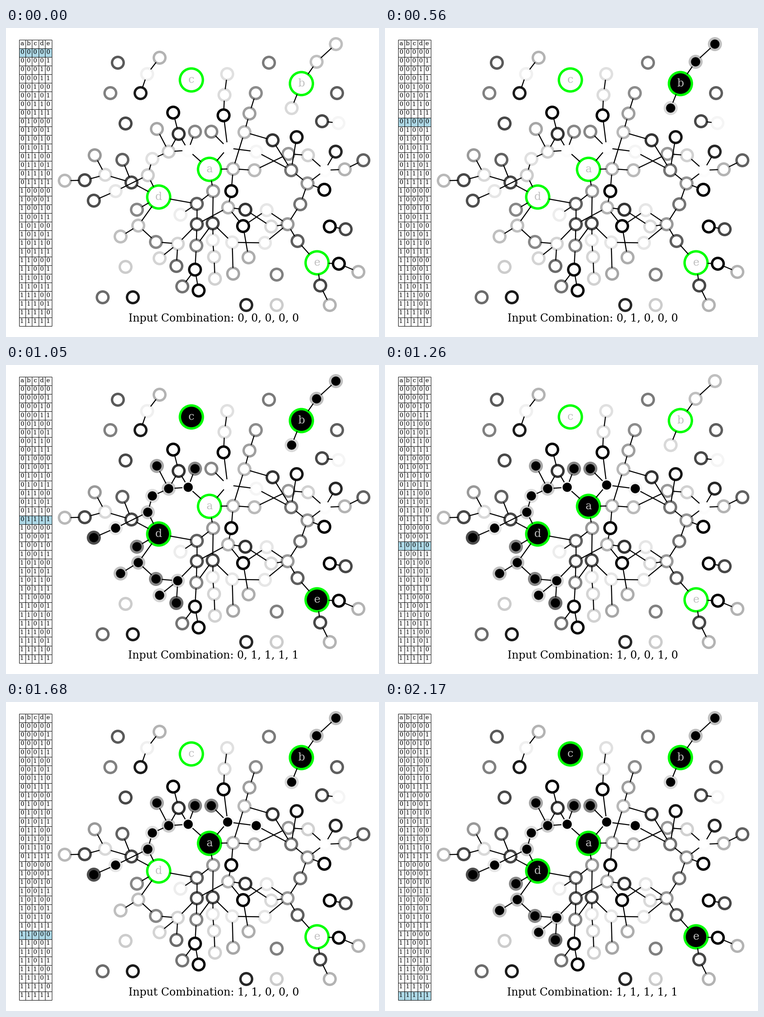
Animation, 822 px wide and 681 px high, one loop 2.24 s. Source, as a matplotlib script:

```python
import matplotlib.pyplot as plt
import numpy as np
from itertools import product
from matplotlib.animation import FuncAnimation
from matplotlib.collections import LineCollection
from matplotlib.patches import Circle, Rectangle

W, H, DPI = 822, 681, 64
PT = 72 / DPI  # points per pixel
plt.rcParams["font.family"] = "DejaVu Serif"

INPUTS = {"a": (448, 311), "b": (650.5, 122), "c": (408, 114),
          "d": (336, 372), "e": (685, 517)}

# Each node: x, y, grey level in percent (threshold = 1 - grey)
NORTH = [(401, 269, 99), (416, 228, 53), (380, 233, 20), (368, 186, 0),
         (358, 272, 80), (332, 222, 65), (322, 288, 88), (488, 264, 99),
         (452, 228, 53), (479, 192, 0), (481, 147, 86), (487, 101, 88),
         (551, 272, 96), (500, 310, 70), (525, 229, 72), (536, 188, 62),
         (550, 143, 55), (587, 247, 20), (547, 313, 73)]
WEST = [(312, 324, 80), (241, 359, 90), (193, 380, 30), (276, 340, 28),
        (256, 290, 38), (218, 323, 85), (195, 280, 60), (173, 335, 28),
        (129, 336, 72), (288, 400, 53), (291, 435, 75), (252, 459, 75),
        (330, 471, 53), (378, 475, 83), (338, 507, 83), (375, 524, 42)]
SOUTH = [(456, 359, 60), (420, 387, 38), (384, 411, 93), (420, 432, 30),
         (455, 430, 28), (419, 479, 53), (416, 532, 5), (388, 569, 45),
         (424, 578, 3), (455, 467, 90), (458, 504, 83), (460, 552, 82),
         (498, 472, 90), (500, 541, 65), (570, 473, 90), (496, 359, 0),
         (489, 395, 70), (527, 400, 20), (522, 436, 0), (534, 505, 68),
         (574, 401, 90), (584, 437, 85)]
EAST = [(622, 277, 60), (665, 280, 82), (628, 313, 45), (640, 240, 8),
        (664, 342, 58), (702, 313, 99), (726, 272, 15), (746, 311, 70),
        (787, 291, 38), (701, 356, 0), (648, 388, 45), (620, 432, 60),
        (642, 469, 37), (733, 519, 0), (776, 537, 70), (692, 567, 28),
        (713, 610, 70)]
FREE = [(684, 74, 75), (726.5, 35, 75), (629, 176, 85), (310.5, 101, 94),
        (338, 65, 70), (296, 143, 10), (696, 205, 28), (732, 209, 96),
        (713, 437, 0), (748, 443, 28), (246, 76, 35), (229.5, 143, 50),
        (263, 210, 28), (579, 76, 48), (729, 143, 37), (263, 526, 80),
        (212.5, 593, 42), (279, 593, 10), (529, 610, 15), (596, 543, 50),
        (596, 610, 80)]

PATHS = """
a n0 n4 n6 w0 w1 w2; n1 n0 n2 n4 n5; n2 n3; a n7 n9 n10 n11; n8 n7 n12 e2;
a n13 n14 n15 n16; n14 n17 e2; n13 n18 e0 e1 e5; n13 s15 s16; a s0 s4; s0 s1;
d w0; d w3 w5 w7 w8; w3 w4; w5 w6; d w9; d w10 w11; w10 w12 w13 w14; w13 w15;
w13 s3; d s1 s3 s5 s6 s7; s1 s2; s6 s8; s3 s16 s17 s21 e11; s5 s4 s9 s10 s11;
s4 s12 s14 e11; s12 s13; s16 s18 s19; s18 s20 e11; e3 e2 e4 e5 e6; e5 e7 e8;
e9 e4 e10 e11 e12 e; e e13 e14; e e15 e16; b f0 f1; b f2; f4 f3 f5; f6 f7;
f8 f9"""

groups = {"n": NORTH, "w": WEST, "s": SOUTH, "e": EAST, "f": FREE}
nodes = {f"{g}{i}": p for g, pts in groups.items() for i, p in enumerate(pts)}
pos = {k: np.array(p[:2]) + 0.5 for k, p in {**INPUTS, **nodes}.items()}
radius = {k: 25.3 if k in INPUTS else 12.8 for k in pos}

edges = []
for path in PATHS.split(";"):
    keys = path.split()
    edges += zip(keys, keys[1:])
near = {k: [] for k in pos}
for p, q in edges:
    near[p].append(q)
    near[q].append(p)


def cascade(bits):
    """A node fires once its share of active neighbours meets its threshold."""
    active = {k for k, bit in zip(INPUTS, bits) if bit}
    while True:
        fired = {k for k, (_, _, grey) in nodes.items()
                 if k not in active and near[k]
                 and sum(q in active for q in near[k]) / len(near[k])
                 >= 1 - grey / 100}
        if not fired:
            return active
        active |= fired


def clipped(p, q):
    step = pos[q] - pos[p]
    step = step / np.hypot(*step)
    return pos[p] + step * radius[p], pos[q] - step * radius[q]


fig = plt.figure(figsize=(W / DPI, H / DPI), dpi=DPI, facecolor="white")
ax = fig.add_axes([0, 0, 1, 1])
ax.set(xlim=(0, W), ylim=(H, 0))
ax.axis("off")


def label(x, y, text, size, color="black"):
    return ax.text(x, y, text, size=size * PT, color=color, ha="center",
                   va="baseline", zorder=5)


# Network
discs = {}
for k, xy in pos.items():
    edge = "lime" if k in INPUTS else str(nodes[k][2] / 100)
    discs[k] = ax.add_patch(Circle(xy, radius[k], fc="white", ec=edge,
                                   lw=5.3 * PT, zorder=2))
ax.add_collection(LineCollection([clipped(*e) for e in edges], colors="black",
                                 linewidths=2.3 * PT, zorder=3))
for k in INPUTS:
    label(pos[k][0], pos[k][1] + 6.5, k, 23.6, "silver")

# Truth table
LEFT, TOP, COL, ROW = 28.5, 25.5, 14.4, 19.13
COMBOS = list(product((0, 1), repeat=5))
rows = [list(INPUTS)] + COMBOS
right, bottom = LEFT + 5 * COL, TOP + ROW * len(rows)
grid = [[(LEFT, TOP + i * ROW), (right, TOP + i * ROW)]
        for i in range(len(rows) + 1)]
grid += [[(LEFT + j * COL, TOP), (LEFT + j * COL, bottom)] for j in range(6)]
ax.add_collection(LineCollection(grid, colors="black", linewidths=PT, zorder=4))
for i, row in enumerate(rows):
    for j, cell in enumerate(row):
        label(LEFT + (j + 0.45) * COL, TOP + i * ROW + 12.5, str(cell), 13.3)
marker = ax.add_patch(Rectangle((LEFT, TOP), 5 * COL, ROW, fc="lightblue",
                                lw=0, zorder=1))
caption = label(457.5, 646.5, "", 23.6)


def draw(i):
    bits = COMBOS[i]
    active = cascade(bits)
    for k, disc in discs.items():
        disc.set_facecolor("black" if k in active else "white")
    marker.set_y(TOP + (i + 1) * ROW)
    caption.set_text("Input Combination: " + ", ".join(map(str, bits)))
    return [*discs.values(), marker, caption]


anim = FuncAnimation(fig, draw, frames=len(COMBOS), interval=70, repeat=True,
                     repeat_delay=0, blit=False)
plt.show()
```
